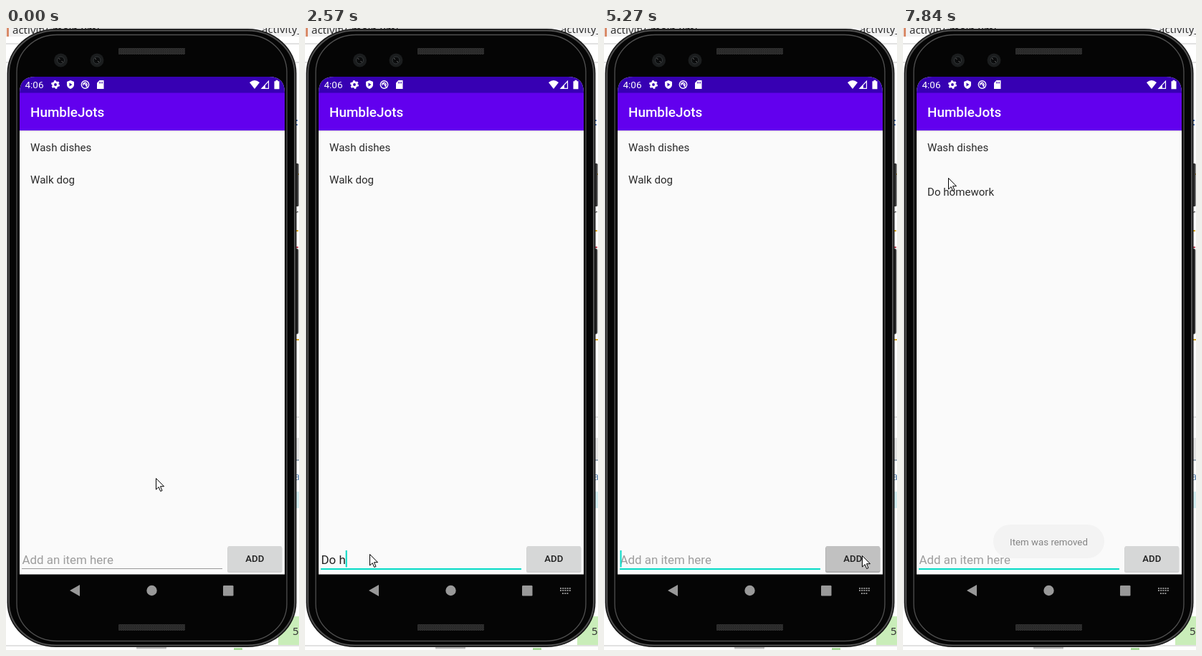
Animation, 409 px wide and 868 px high, one loop 7.99 s. Source, as an HTML page:

```html
<!DOCTYPE html>
<html lang="en">
<head>
<meta charset="utf-8">
<title>To-do app demo</title>
<style>
html, body { margin: 0; width: 100%; height: 100%; overflow: hidden; background: #fff; }
svg { display: block; font-family: Roboto, sans-serif; }
text { white-space: pre; }
.item { font-size: 15.1px; fill: #2a2a2a; }
.field { font-size: 16.9px; }
.code { font: 15px "Noto Sans", sans-serif; }
</style>
</head>
<body>
<svg width="409" height="868" viewBox="0 0 409 868">
  <defs>
    <pattern id="mesh" width="3" height="3" patternUnits="userSpaceOnUse">
      <path d="M0 0h3v3h-3z" fill="#303030"/><path d="M0 0h1v1h-1zM1.5 1.5h1v1h-1z" fill="#191919"/>
    </pattern>
    <linearGradient id="drop" x2="0" y2="1">
      <stop stop-color="#000" stop-opacity=".12"/><stop offset="1" stop-color="#000" stop-opacity="0"/>
    </linearGradient>
    <g id="camera">
      <circle r="9.5" fill="#1b1d1e"/><circle r="5" fill="#0b0c0d" stroke="#34383a"/>
      <path d="M-3 -3l2 2M3 3l-2 -2" stroke="#666"/>
    </g>
  </defs>

  <!-- editor window behind the phone -->
  <path d="M0 0h409v12H0z" fill="#f2f2f2"/>
  <path d="M0 22h409M0 48h409M380 543h29M0 862h409" stroke="#c4c4c4"/>
  <path d="M1 0h3v12h-3z" fill="#d98a68"/>
  <g class="code" fill="#333">
    <text x="9" y="8">activity_main.xml</text><text x="357" y="7">activity_main</text>
    <text x="404" y="136" fill="#003c9c">:</text><text x="402" y="264">r</text>
    <text x="402" y="591">y</text><text x="402" y="631" fill="#5b83ad">a</text>
  </g>
  <path d="M400 572h9v32h-9z" fill="#e4e4e4"/>
  <path d="M400 603h9" stroke="#9aa9b8" stroke-width="2"/>
  <path d="M400 647h9v23h-9z" fill="#d2edf1"/>
  <path d="M380 821h29v40h-29z" fill="#c9edb9"/>
  <path d="M318 865h12v3h-12z" fill="#a8d99a"/>
  <path d="M405 204h4M405 283h3M405 435h4" stroke="#d9a520" stroke-width="2"/>
  <path d="M405 306h3" stroke="#bd4355" stroke-width="2"/>
  <path d="M182 865h42" stroke="#bbb" stroke-width="3"/>

  <!-- phone body -->
  <rect x="402" y="189" width="6.500" height="60" rx="1.500" fill="#343434"/>
  <rect x="402" y="308" width="6" height="119" rx="2" fill="#222" stroke="#666" stroke-width=".8"/>
  <rect x="1.500" y="1" width="404" height="863" rx="68" ry="62" fill="#111"/>
  <rect x="4" y="3.500" width="399" height="858" rx="66" ry="60" fill="#050505" stroke="#4e4e4e" stroke-width="2"/>
  <rect x="15" y="9.500" width="377" height="846" rx="56" ry="52" fill="#050505" stroke="#505050" stroke-width="1.300"/>
  <text class="code" x="400" y="847" fill="#333">55</text>
  <use href="#camera" x="76.500" y="45"/><use href="#camera" x="127" y="45"/>
  <rect x="157" y="28" width="93" height="9" rx="1" fill="url(#mesh)"/>
  <rect x="157" y="832" width="93" height="9" rx="1" fill="url(#mesh)"/>

  <!-- screen -->
  <path d="M19 762.500V90q0-22 22-22h326q22 0 22 22v672.500z" fill="#fafafa"/>
  <path d="M19 91V90q0-22 22-22h326q22 0 22 22v1z" fill="#3700b3"/>
  <path d="M19 90.500h370V143h-370z" fill="#6200ee"/>
  <path d="M19 143h370v2.500h-370z" fill="url(#drop)"/>
  <g fill="#fff">
    <text x="26.500" y="84" font-size="13.500">4:06</text>
    <text x="34" y="124" font-size="18.900" font-weight="500">HumbleJots</text>
    <circle cx="69" cy="79" r="3.300" fill="none" stroke="#fff" stroke-width="2.800"/>
    <circle cx="69" cy="79" r="5" fill="none" stroke="#fff" stroke-width="2" stroke-dasharray="2.600 2.636"/>
    <path d="M90 73l5 2v4q0 4-5 6q-5-2-5-6v-4z"/>
    <path d="M88.500 76.500v5l4-2.500z" fill="#3700b3"/>
    <circle cx="110.500" cy="79" r="5.200" fill="none" stroke="#fff" stroke-width="1.400"/>
    <path d="M108 80a2.600 2.600 0 1 1 4 1l2.500 2.500M109 77l4 4" fill="none" stroke="#fff" stroke-width="1.300"/>
    <path d="M130.500 73h6v12h-9.500v-8.500z"/>
    <path d="M130.500 75v2.500M132.500 75v2.500M134.500 75v2.500" stroke="#3700b3" stroke-width=".9"/>
    <path d="M340 76q7-6 14 0l-7 9z"/>
    <path d="M357 84.300l9.500-10v10z" fill="none" stroke="#fff" stroke-width="1.200"/>
    <path d="M357 84.500l5-5.300v5.300z"/>
    <path d="M374.500 74.300h2v-1.500h3v1.500h2v11h-7z"/>
  </g>
  <g fill="#999">
    <path d="M89 785l14-8v16z"/><circle cx="203.500" cy="785" r="7.200"/>
    <rect x="303" y="778" width="14.500" height="14.500" rx="1.200"/>
    <path id="keys" d="M356 782h15M356 785h15M359 789h9" stroke="#8b8b8b" stroke-width="2" stroke-dasharray="2 1.200"/>
  </g>

  <text class="item" x="34" y="171.500">Wash dishes</text>
  <text class="item" id="walk" x="34" y="216.500">Walk dog</text>
  <text class="item" id="homework" x="34">Do homework</text>

  <text class="field" id="hint" x="22.500" y="747.500">Add an item here</text>
  <text class="field" id="typed" x="22.500" y="747.500" fill="#222"></text>
  <rect id="line" x="22" y="754" width="280"/>
  <rect id="caret" y="729" width="2" height="23.500" fill="#03dac5"/>
  <rect id="shade" x="309" y="724" width="76.500" height="36" rx="2.500"/>
  <rect id="button" x="309.500" y="723" width="75.500" height="35.500" rx="2"/>
  <text x="347.300" y="745.300" font-size="13.200" font-weight="500" text-anchor="middle" fill="#202020">ADD</text>

  <g id="toast">
    <rect id="pill" y="693" height="47" rx="23.500" fill="#eee"/>
    <text id="message" x="203.500" y="722" font-size="13.300" text-anchor="middle" fill="#303030"></text>
  </g>
  <path id="cursor" d="M.5 .5V16l3.700-3.400 2.500 5.900 2.300-1-2.500-5.800h5z" fill="#fff" stroke="#000" stroke-linejoin="round"/>
</svg>

<script>
const LOOP = 7990, STEP = 120;
const FOCUS = 930, READY = 1080, CLICK = 5270, REMOVE = 7700;
const TYPE = 2070, KEY = 166, BLINK = 490;
const PHRASE = 'Do homework';
const TYPED = TYPE + KEY * (PHRASE.length - 1);

const $ = id => document.getElementById(id);
const set = (id, attrs) => {
  for (const key in attrs) $(id).setAttribute(key, attrs[key]);
};
const clamp = p => Math.min(1, Math.max(0, p));
const easeOut = p => 1 - (1 - p) ** 2;
const smooth = p => (1 - Math.cos(Math.PI * p)) / 2;
const ramp = (t, from, to) => clamp((t - from) / (to - from));
const stepsSince = (t, start) => Math.floor((t - start) / STEP);
const stepped = (t, start) => start + STEP * stepsSince(t, start);

// Mouse moves: when one starts, in how many steps, and where it ends.
const moves = [
  { at: 150, steps: 2, x: 182, y: 810 },
  { at: 420, steps: 3, x: 93, y: 737 },
  { at: 810, steps: 1, x: 90, y: 734 },
  { at: 4520, steps: 1, x: 236, y: 751 },
  { at: 4640, steps: 3, x: 360, y: 736 },
  { at: 5920, steps: 2, x: 141, y: 462 },
  { at: 6200, steps: 1, x: -20, y: 200 },
  { at: 6350, steps: 3, x: 21, y: 179 },
  { at: 6750, steps: 3, x: 63, y: 209 }
];

function pointer(t) {
  let x = 209, y = 628;
  for (const move of moves.filter(m => m.at <= t)) {
    const p = easeOut(clamp((stepsSince(t, move.at) + 1) / move.steps));
    x += (move.x - x) * p;
    y += (move.y - y) * p;
  }
  return `translate(${Math.round(x)} ${Math.round(y)})`;
}

// The caret stays lit while keys arrive and blinks from the latest input on.
function caretLit(t) {
  if (t < READY) return false;
  const input = t >= CLICK ? CLICK : t >= TYPE ? Math.min(t, TYPED) : READY;
  return (t - input) % (2 * BLINK) < BLINK;
}

function draw(t) {
  const focused = t >= FOCUS, removed = t >= REMOVE;
  const pressed = t >= CLICK && t < CLICK + 2 * STEP;
  set('cursor', { transform: pointer(t) });

  const count = t < CLICK ? Math.floor((t - TYPE) / KEY) + 1 : 0;
  const text = PHRASE.slice(0, Math.max(0, count));
  $('typed').textContent = text;
  const width = text ? $('typed').getComputedTextLength() : 0;
  set('caret', { x: 22.5 + width, opacity: +caretLit(t) });
  set('hint', { opacity: text ? 0 : 1, fill: focused && t < READY ? '#757575' : '#9d9d9d' });
  set('line', { height: focused ? 2 : 1, fill: focused ? '#03dac5' : '#999' });
  set('keys', { opacity: t >= READY ? 1 : 0 });
  set('button', { fill: pressed ? '#c1c1c1' : '#d6d7d7' });
  set('shade', { fill: pressed ? '#a5a5a5' : '#cfcfcf' });

  const sampled = stepped(t, CLICK);
  const slide = smooth(ramp(stepped(t, REMOVE + 20), REMOVE + 20, REMOVE + 230));
  set('walk', { opacity: removed ? 0 : 1 });
  set('homework', { y: 262 - 45 * slide, opacity: ramp(sampled, CLICK, CLICK + 2 * STEP) });

  const fade = removed
    ? ramp(stepped(t, REMOVE + 20), REMOVE - 80, REMOVE + 300)
    : ramp(sampled, CLICK, CLICK + 4 * STEP) * (1 - ramp(t, 7200, 7550));
  const half = removed ? 77.5 : 70.5;
  $('message').textContent = removed ? 'Item was removed' : 'Item was added';
  set('pill', { x: 203.5 - half, width: 2 * half });
  set('toast', { opacity: fade });
}

const start = performance.now();
function tick() {
  draw((performance.now() - start) % LOOP);
  requestAnimationFrame(tick);
}
tick();
</script>
</body>
</html>
```
